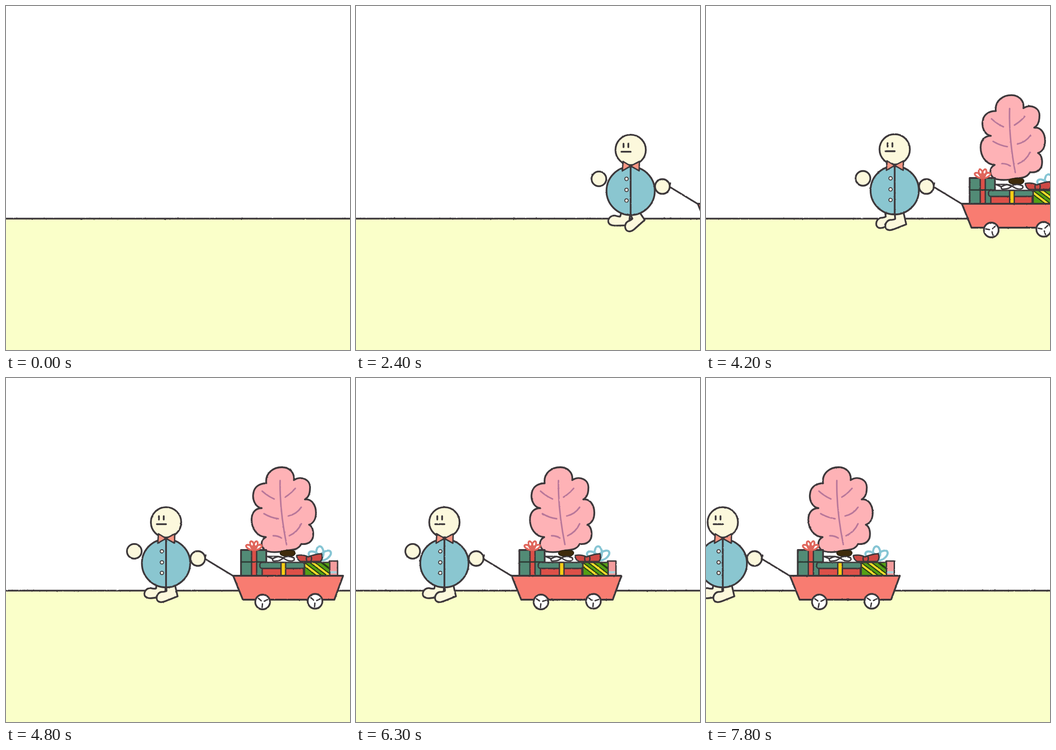
An HTML page that plays this animation: 748x748 px, repeating every 8 s.

```html
<!DOCTYPE html>
<html lang="en">
<head>
<meta charset="utf-8">
<title>Gift wagon</title>
<style>
  html, body { margin: 0; width: 100%; height: 100%; overflow: hidden; background: #fff; }
  svg { display: block; width: 100vw; height: 100vh; }
  .ink { stroke: #3d383b; stroke-width: 3.8; stroke-linecap: round; stroke-linejoin: round; }
  .line { fill: none; }
  .skin { fill: #fcf8dc; }
  .green { fill: #528b76; }
  .red { fill: #dc5048; }
  .yellow { fill: #f6cd14; }
  .coral { fill: #f99683; }
  .thin { stroke-width: 3; }
</style>
</head>
<body>
<svg viewBox="0 0 748 748">
  <defs>
    <!-- uneven pencil edge, reseeded on every step -->
    <filter id="rough" filterUnits="userSpaceOnUse" x="-10" y="-10" width="768" height="768" color-interpolation-filters="sRGB">
      <feTurbulence id="noise" type="fractalNoise" baseFrequency="0.22" numOctaves="2"/>
      <feDisplacementMap in="SourceGraphic" scale="2" xChannelSelector="R" yChannelSelector="G"/>
    </filter>
    <clipPath id="wrap"><path d="M650 401H704V430H650Z"/></clipPath>
    <path id="leg" class="ink skin" d="M348 448L349 463Q346 465 338 465C326 467 323 485 335 487Q340 488 347 485L373 475L367 448"/>
    <g id="spokes" class="ink thin line">
      <path id="spoke" d="M0 4V12"/>
      <use href="#spoke" transform="rotate(126)"/>
      <use href="#spoke" transform="rotate(240)"/>
    </g>
  </defs>

  <g filter="url(#rough)">
    <path fill="#fff" d="M-10 -10H758V470H-10Z"/>
    <path fill="#faffc9" d="M-10 462H758V758H-10Z"/>
    <path class="ink line" d="M-10 462.3H758"/>

    <g id="parade">
      <g id="tree">
        <path class="ink" fill="#feb2b6" d="M566 229C563 206 582 194 600 194C616 194 628 206 626 222C643 211 663 222 661 240C661 253 657 260 650 264C665 262 674 277 674 293C674 307 668 316 659 319C669 324 669 340 667 348C662 360 652 362 642 361C636 373 624 374 610 375C598 378 582 380 569 377C555 374 550 354 565 346C545 345 534 326 534 308C534 292 543 283 556 283C542 281 535 264 538 250C540 236 552 229 566 229Z"/>
        <path fill="none" stroke="#b8779a" stroke-width="3.3" stroke-linecap="round" d="M596 223C595 275 602 322 610 362M557 246Q569 257 583 263M629 240Q620 251 607 259M561 295Q576 304 592 306M642 281Q632 296 614 300M581 343Q592 343 599 348M642 317Q634 335 616 343"/>
      </g>
      <path fill="#3f2c0c" stroke="#2b220f" stroke-width="2" d="M596 381Q597 374 612 375Q630 374 629 381Q627 389 612 387Q597 388 596 381Z"/>

      <!-- tall box -->
      <path class="ink green" d="M511 374H566V430H511Z"/>
      <path class="ink thin red" d="M534 374H545V430H534Z"/>
      <path class="line" stroke="#2c3a34" stroke-width="3" d="M510 400H566"/>
      <g id="redBow" fill="none" stroke="#e0665c" stroke-width="3.8"></g>

      <!-- pink box -->
      <path class="ink thin" fill="#f49c9d" d="M703 398H721V430H703Z"/>
      <path fill="#a9cfd8" d="M705 420H719V425H705Z"/>
      <g id="blueBow" fill="none" stroke="#86c5d4" stroke-width="4.6"></g>

      <!-- striped box -->
      <path fill="#54a015" d="M649 401H704V430H649Z"/>
      <g id="stripes" clip-path="url(#wrap)"></g>
      <path class="ink thin line" d="M649 401H704V430H649Z"/>
      <path class="ink thin" fill="#cf4a45" d="M657 389Q645 383 632 386Q632 394 640 399H684Q690 392 686 382Q672 383 657 389Z"/>
      <path class="ink thin line" d="M654 388Q652 393 654 398M663 387Q666 393 663 398"/>

      <!-- flat box -->
      <path class="ink thin red" d="M557 414H647V430H557Z"/>
      <rect class="ink thin green" x="552" y="401" width="97" height="13" rx="5"/>
      <path class="ink thin yellow" d="M598 401H608V430H598Z"/>
      <path class="ink thin" fill="#fff" d="M603 391Q593 385 580 393Q578 399 586 398Q597 398 603 391Q612 385 626 391Q629 397 621 398Q610 398 603 391Z"/>
      <path class="ink thin line" d="M568 388H592M568 388L580 393M592 388L603 392"/>

      <!-- wagon -->
      <path class="ink" fill="#f87c71" d="M494 430H733L714 482H515Z"/>
      <g transform="translate(558 487)"><circle class="ink" r="16" fill="#fff"/><use class="wheel" href="#spokes"/></g>
      <g transform="translate(672 485.5)"><circle class="ink" r="16" fill="#fff"/><use class="wheel" href="#spokes"/></g>

      <!-- walker -->
      <use id="backLeg" href="#leg"/>
      <use id="frontLeg" href="#leg"/>
      <g id="torso">
        <circle class="ink" cx="348" cy="403" r="52.5" fill="#8ac6d0"/>
        <path class="ink line" d="M348 350V455"/>
        <g class="ink" fill="#fffdf0" style="stroke-width:2">
          <circle cx="339" cy="377" r="3.7"/>
          <circle cx="339" cy="401" r="3.7"/>
          <circle cx="339" cy="424" r="3.7"/>
        </g>
        <circle class="ink skin" cx="348" cy="314" r="33"/>
        <path class="ink line" d="M332.500 300.500V308M343 300.500V308M328 318H348"/>
        <path class="ink thin coral" d="M348 349L331.500 339L330 359.500ZM348 349L367 339L366.500 359.500Z"/>
        <circle class="ink skin" cx="279" cy="377" r="16"/>
      </g>
      <path class="ink line" d="M434 394L495 431"/>
      <circle class="ink skin" cx="417" cy="392.5" r="16"/>
      <path class="ink thin line" d="M434.500 385L432 397"/>
    </g>
  </g>
</svg>
<script>
const $ = id => document.getElementById(id);
const place = (el, value) => el.setAttribute('transform', value);

// loops of ribbon fanned out around a knot
function fan(id, x, y, rx, ry, angles) {
  $(id).innerHTML = angles.map(a =>
    `<ellipse cx="${x}" cy="${y - ry}" rx="${rx}" ry="${ry}" transform="rotate(${a} ${x} ${y})"/>`).join('');
}
fan('redBow', 539, 373, 4.2, 9.5, [-62, -20, 20, 62]);
fan('blueBow', 683, 394, 8, 14, [-60, -2, 54]);

const stripe = (x, color, width) =>
  `<path stroke="${color}" stroke-width="${width}" d="M${x - 8} 395l54 41"/>`;
$('stripes').innerHTML =
  [643, 666].map(x => stripe(x, '#263c12', 9) + stripe(x, '#f2dc2a', 4.5)).join('') +
  stripe(686, '#263c12', 4);

const LOOP = 8000, STEP = 300, STRIDE = 31.15;
let shown = -1;

function draw(n) {
  // the walk cycle repeats every five steps
  const wave = peak => Math.cos((n - peak) * Math.PI * 0.4);
  place($('parade'), `translate(${498.4 - STRIDE * n} 0)`);
  place($('tree'), `rotate(${-1.2 * wave(2.25)} 610 376)`);
  place($('torso'), `translate(0 ${-1 + 1.3 * wave(1.7)})`);
  place($('frontLeg'), `rotate(${-6 - 18 * wave(2.5)} 349 455)`);
  place($('backLeg'), `translate(-21 -5) rotate(${11 + 20 * wave(2.1)} 349 455)`);
  for (const wheel of document.querySelectorAll('.wheel')) place(wheel, `rotate(${5 - 48 * (n - 1)})`);
  $('noise').setAttribute('seed', n + 1);
}

function tick() {
  const n = Math.floor(performance.now() % LOOP / STEP);
  if (n !== shown) draw(shown = n);
  requestAnimationFrame(tick);
}
tick();
</script>
</body>
</html>
```
